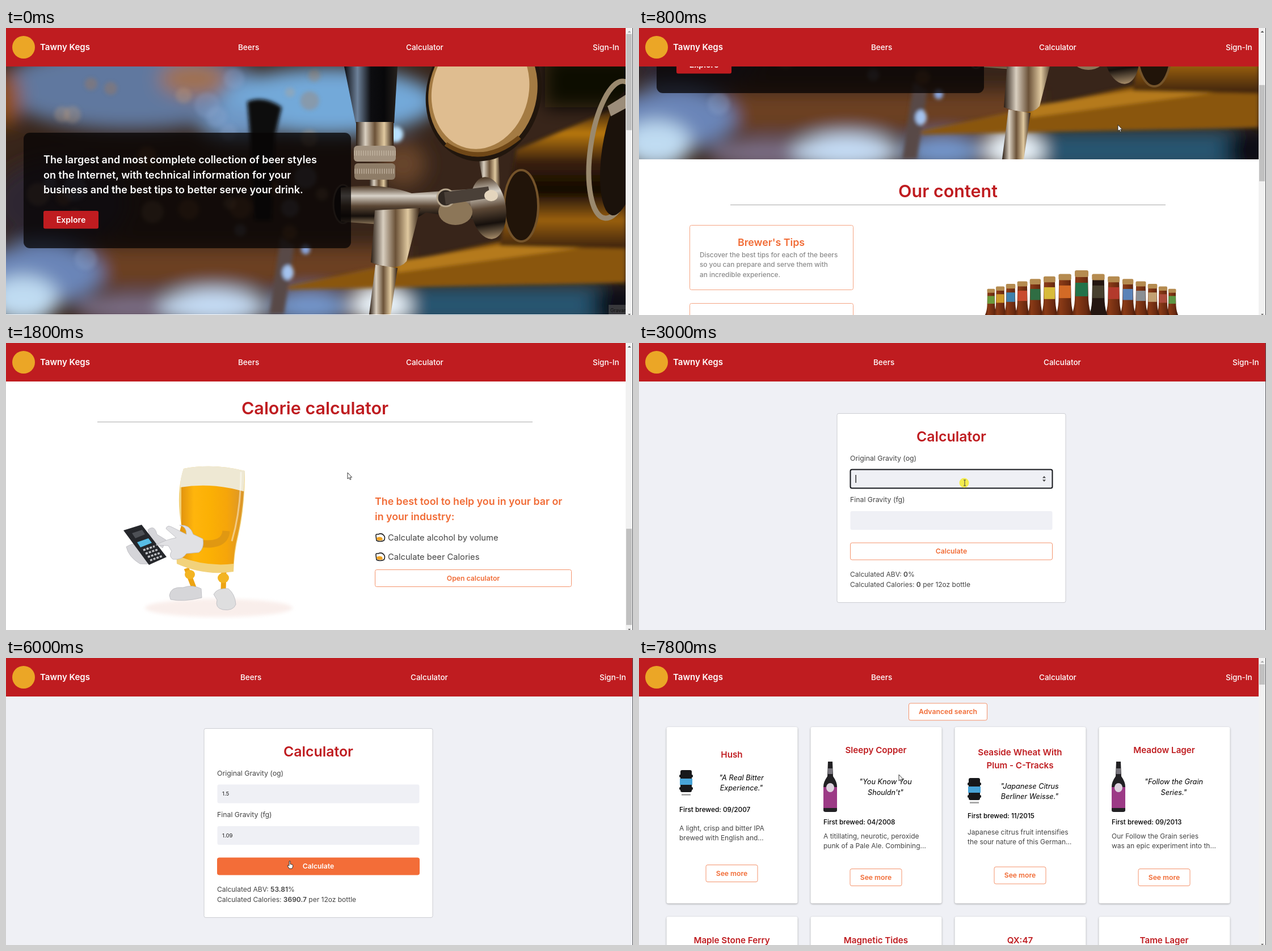
Animation of 1105 by 507 pixels, one loop 8000 ms. Source, as an HTML page:

```html
<!DOCTYPE html>
<html lang="en">
<head>
<meta charset="utf-8">
<title>Beer site tour</title>
<style>
html, body { margin: 0; width: 100%; height: 100%; overflow: hidden; background: #fff; }
svg { display: block; width: 1105px; height: 507px; }
text { font: 400 12px Inter, "Open Sans", sans-serif; font-optical-sizing: none; fill: #444; }
.mid { text-anchor: middle; }
.brand { font-size: 15px; font-weight: 600; fill: #fff; }
.nav { font-size: 13.5px; font-weight: 500; fill: #fff; }
.lead { font-size: 18px; font-weight: 600; fill: #fff; }
.explore { font-size: 14.2px; font-weight: 600; fill: #fff; text-anchor: middle; }
.h1 { font-size: 30.5px; font-weight: 600; fill: #bf1c20; text-anchor: middle; }
.h2 { font-size: 17.8px; font-weight: 600; fill: #f16b35; }
.note { font-size: 11.8px; font-weight: 500; fill: #8b8b8b; }
.item { font-size: 14.7px; }
.h3 { font-size: 24.8px; font-weight: 600; fill: #bf1c20; text-anchor: middle; }
.h4 { font-size: 15.2px; font-weight: 600; fill: #bf1c20; text-anchor: middle; }
.quote { font-size: 12.7px; font-style: italic; fill: #000; text-anchor: middle; }
.first { font-size: 11.8px; font-weight: 500; fill: #000; }
.label { font-size: 12.3px; }
.value { font-size: 9.6px; fill: #222; }
.strong { font-weight: 600; }
.btn rect { fill: #fff; stroke: #f4936c; }
.btn text { font-size: 12.2px; font-weight: 600; fill: #f16b35; text-anchor: middle; }
.btn.hot rect { fill: #f36d38; stroke: #f36d38; }
.btn.hot text { fill: #fff; }
.field { fill: #eff0f5; }
.field.on { stroke: #15171c; stroke-width: 2; }
.card { fill: #fff; filter: drop-shadow(0 1px 1.5px #0005); }
</style>
</head>
<body>
<svg id="stage" viewBox="0 0 1105 507"></svg>
<script>
const $ = id => document.getElementById(id);
const text = (x, y, s, cls = '') => `<text x="${x}" y="${y}" class="${cls}">${s}</text>`;
const lines = (x, y, step, list, cls) => list.map((s, i) => text(x, y + i * step, s, cls)).join('');
const rect = (x, y, w, h, fill, more = '') =>
  `<rect x="${x}" y="${y}" width="${w}" height="${h}" fill="${fill}" ${more}/>`;
const oval = (x, y, rx, ry, fill, more = '') =>
  `<ellipse cx="${x}" cy="${y}" rx="${rx}" ry="${ry}" fill="${fill}" ${more}/>`;
const path = (d, fill, more = '') => `<path d="${d}" fill="${fill}" ${more}/>`;
const button = (x, y, w, label, id = '') => `<g class="btn" id="${id}">
  ${rect(x + .5, y + .5, w - 1, 30, '#fff', 'rx="3"')}${text(x + w / 2, y + 19.5, label, 'mid')}</g>`;
const gradient = (id, x2, y2, ...colors) => `<linearGradient id="${id}" x2="${x2}" y2="${y2}">` +
  colors.map((c, i) => `<stop offset="${i / (colors.length - 1)}" stop-color="${c}"/>`).join('') + '</linearGradient>';

const defs = `<defs>
  ${gradient('chrome', 0, 1, '#4a3522', '#d8d2c8', '#5c4836', '#16100c', '#a48a68')}
  ${gradient('steel', 1, 0, '#2a1c12', '#d9cfc0', '#6b5238', '#e0c9a0', '#2c1a0e')}
  ${gradient('handle', 1, 0, '#0a0b10', '#6d8199', '#0d0d10', '#08080a', '#25201c')}
  ${gradient('pipe', 0, 1, '#1a0d04', '#b8780f', '#3a2008', '#130a05', '#9a600d', '#3b2109')}
  ${gradient('beer', 1, 0, '#d98a10', '#ffb50c', '#fbb004', '#f6a50a', '#d9952c')}
  ${gradient('glass', 1, 0, '#2c1109', '#8a3a16', '#6a2a10', '#240d07')}
  <filter id="soft" x="-20%" y="-20%" width="140%" height="140%"><feGaussianBlur stdDeviation="16"/></filter>
  <filter id="haze"><feGaussianBlur stdDeviation="3"/></filter>
  <clipPath id="photo"><rect y="68" width="1092" height="438"/></clipPath>
</defs>`;

function bokeh() {
  const rnd = n => Math.abs(Math.sin(n * 127.1) * 43758.5) % 1;
  return Array.from({ length: 30 }, (_, i) => {
    const r = 8 + 15 * rnd(i + .7);
    return oval(40 + 520 * rnd(i + .1), 75 + 370 * rnd(i + .4), r, r,
      ['#c9a07a', '#8fa9d0', '#b9753a'][i % 3], 'opacity=".28"');
  }).join('');
}

function barPhoto() {
  return `<g clip-path="url(#photo)">
    ${rect(0, 68, 1092, 438, '#38251a')}
    <g filter="url(#soft)">
      ${oval(220, 105, 230, 75, '#60789f')}${oval(95, 310, 120, 80, '#2e2832')}
      ${oval(0, 125, 26, 50, '#93500f')}${oval(330, 90, 60, 30, '#a0714f')}
      ${oval(570, 130, 190, 60, '#73a9d9')}${oval(410, 170, 70, 30, '#6e96c4')}
      ${rect(140, 385, 560, 75, '#6c4121')}${oval(60, 435, 110, 55, '#6b85b8')}
      ${oval(30, 480, 62, 42, '#c0dcf2')}${oval(230, 495, 110, 26, '#7b6e86')}
      ${oval(365, 492, 95, 32, '#c5dcf5')}${oval(535, 492, 75, 28, '#7599d0')}
      ${rect(690, 455, 420, 70, '#285471')}${rect(950, 50, 170, 90, '#080706')}
      ${oval(1090, 490, 60, 40, '#0c1117')}${oval(660, 490, 54, 32, '#eef8ff')}
      ${oval(700, 240, 40, 40, '#68452c')}
    </g>
    <g filter="url(#haze)">
      ${bokeh()}
      ${path('M470 462 L1092 330 V450 L690 458Z', '#8a560f')}
      ${path('M690 412 L1092 350 V378 L690 432Z', '#b57a1b')}
      ${path('M900 215 L1092 135 V390 L870 385Z', 'url(#pipe)')}
      ${path('M425 130 Q455 118 486 140 L474 190 L468 340 H438 L430 190Z', '#11100f')}
      ${path('M484 370 L508 385 L490 506 H464Z', '#594a47')}
      ${oval(497, 432, 10, 13, '#a4c3ef')}${oval(528, 391, 8, 9, '#89a5dc')}
      ${oval(687, 188, 13, 14, '#b9e2ff')}
    </g>
    ${path('M1040 506 H0', 'none')}
    ${oval(1072, 215, 42, 122, 'none', 'transform="rotate(8 1072 215)" stroke="#9a896e" stroke-width="9"')}
    ${oval(1084, 220, 34, 112, '#1b120b', 'transform="rotate(8 1084 220)"')}
    ${path('M1060 138 L1092 118 V142 L1066 156Z', '#9c8d7a')}
    ${path('M596 68 H690 L684 168 H616Z', 'url(#handle)')}
    ${rect(617, 166, 66, 42, 'url(#steel)')}
    ${rect(640, 266, 34, 26, 'url(#steel)')}
    ${rect(613, 208, 74, 28, '#a39380', 'rx="6"')}${rect(614, 239, 72, 29, '#8e7c67', 'rx="6"')}
    ${path('M613 221 H687 M614 253 H686', 'none', 'stroke="#c9bba8" stroke-width="9" stroke-dasharray="2 2" opacity=".6"')}
    ${oval(594, 311, 17, 34, '#14100d', 'stroke="#57483c" stroke-width="3"')}
    ${path('M590 282 Q660 272 715 292 L850 282 L856 342 L740 326 L700 350 L590 342Z', 'url(#chrome)')}
    ${path('M650 322 L730 318 L706 412 Q690 432 643 414Z', 'url(#steel)')}
    ${path('M651 418 L690 424 L678 506 H640Z', 'url(#steel)')}
    ${path('M832 226 H868 L872 300 H846Z', 'url(#steel)')}
    ${oval(908, 314, 30, 63, '#211409', 'stroke="#74532a" stroke-width="4"')}
    ${oval(850, 318, 31, 55, 'url(#chrome)', 'transform="rotate(-8 850 318)"')}
    ${oval(792, 325, 30, 23, '#8c7658')}${oval(775, 300, 15, 15, '#302822', 'stroke="#b6a68e" stroke-width="3"')}
    ${path('M772 290 L850 280 L854 300 L775 312Z', '#4a4038')}
    ${oval(855, 296, 12, 10, '#e4d5bd')}
    <g transform="rotate(14 840 115)">
      ${oval(842, 115, 101, 121, '#21160d')}${oval(840, 113, 95, 115, '#a47b43')}
      ${oval(835, 111, 85, 105, '#dfbd90')}
    </g>
    ${path('M775 205 Q840 247 905 193', 'none', 'stroke="#6f4717" stroke-width="8"')}
  </g>`;
}

function bottle(x, top, bottom, label, glass) {
  const k = (bottom - top) / 194;
  return `<g transform="translate(${x} ${top}) scale(${k})">
    ${path('M-11 4 H11 L12 52 Q13 72 21 86 Q25 94 25 106 V187 Q24 194 16 194 H-16 Q-24 194 -25 187 V106 Q-25 94 -21 86 Q-13 72 -12 52Z', glass)}
    ${rect(-12, 0, 24, 12, '#b58b50', 'rx="3"')}${rect(-11, 22, 22, 24, label)}
    ${rect(-25, 106, 50, 66, label)}${oval(0, 138, 18, 22, '#e4ddc4', 'opacity=".75"')}
    ${rect(-17, 92, 4, 88, '#fff', 'opacity=".2"')}</g>`;
}

function bottleRow() {
  const left = ['#d36a26', '#d8bb3a', '#2f6d43', '#c94b2e', '#3f81ad', '#cf9a2a', '#6c9a3c'];
  const right = ['#48402f', '#b33a2c', '#5b83b8', '#8a8f94', '#c3a173', '#ab4b3a', '#5e9644'];
  let out = oval(781, 262, 165, 26, '#9b7358', 'opacity=".22" filter="url(#haze)"');
  for (let i = 7; i > 0; i--) {
    const dx = 30.5 * i - 1.1 * i * i, top = 86 + 4.4 * i, bottom = 278 - 7.2 * i;
    out += bottle(780 - dx, top, bottom, left[i - 1], 'url(#glass)') +
      bottle(780 + dx, top, bottom, right[i - 1], i === 1 ? '#241611' : 'url(#glass)');
  }
  return out + bottle(780, 84, 278, '#23734a', 'url(#glass)');
}

const glove = 'stroke="#b9b9be" stroke-width=".8"';
const mascot = `
  ${oval(375, 468, 130, 16, '#f6e3de', 'opacity=".6" filter="url(#haze)"')}
  ${path('M318 398 L331 432 M384 402 L383 436', 'none', 'stroke="#eda413" stroke-width="9"')}
  ${oval(324, 409, 9, 8, '#f3b422')}${oval(383, 415, 10, 9, '#f3b422')}
  ${path('M288 446 Q290 430 312 432 Q328 426 344 434 L345 450 Q312 458 290 453Z', '#d6d6d9', glove)}
  ${path('M366 444 Q372 432 392 434 Q404 444 405 462 Q400 474 382 471 Q368 468 372 454Z', '#dededf', glove)}
  ${path('M313 222 Q365 212 421 226 Q421 290 410 338 Q402 370 401 404 Q350 412 301 390 Q299 362 309 322 Q299 266 313 222Z', '#f2d27b')}
  ${path('M309 254 Q362 244 419 262 Q416 308 407 345 Q402 366 401 390 Q352 396 302 376 Q301 350 309 322Z', 'url(#beer)')}
  ${path('M313 222 Q365 212 421 226 L419 262 Q362 246 307 255 Q307 238 313 222Z', '#eee8d3')}
  ${path('M414 228 Q414 296 398 350', 'none', 'stroke="#fff" stroke-width="3" opacity=".45"')}
  ${path('M388 332 Q386 360 340 354', 'none', 'stroke="#e09812" stroke-width="13"')}
  ${path('M212 360 Q225 352 236 356 L278 372 Q260 394 236 390 Q216 378 212 360Z M250 330 Q262 320 266 338 L282 348 L276 362 L254 344Z', '#d5d5d9', glove)}
  ${path('M207 331 L239 321 L283 378 L252 392Z', '#25272b')}
  ${path('M222 336 L240 330 L245 338 L228 345Z', '#4d5055')}${path('M231 352 L251 345 L257 353 L237 361Z', '#58bde6')}
  ${path('M242 366 L262 359 M246 372 L267 365 M250 378 L271 371 M254 384 L276 376', 'none', 'stroke="#bcbec2" stroke-width="3.5" stroke-dasharray="4 2"')}
  ${path('M264 357 Q282 347 300 344 L282 328 Q284 320 294 326 L318 338 Q318 324 306 322 Q324 320 330 338 L347 346 Q350 362 340 370 L318 372 Q310 384 294 382 Q286 376 292 368 L286 358Z', '#e1e1e4', glove)}`;

const bullet = y => `<g transform="translate(659 ${y})">
  ${path('M-7 -3 Q-8 -7 -3 -6 Q3 -9 7 -4 Q10 0 7 5 Q0 8 -6 5Z', '#fff', 'stroke="#222" stroke-width="1.6"')}
  ${path('M-6 0 Q0 -3 4 0 L5 4 Q0 6 -5 4Z', '#f0a324')}</g>`;

const tip = (y, title, body) => rect(89.5, y + .5, 288, 114, '#fff', 'rx="3" stroke="#f5a483"') +
  text(233, y + 37, title, 'h2 mid') + lines(107, y + 57, 17.4, body, 'note');
const rule = y => rect(161, y, 767, 1, '#aaa');

const home = `<g id="home"><g id="scroller">
  ${rect(0, 68, 1092, 1500, '#fff')}${barPhoto()}
  ${rect(31, 185, 577, 204, '#070504', 'rx="11" opacity=".76"')}
  ${lines(66, 239, 26.5, ['The largest and most complete collection of beer styles',
    'on the Internet, with technical information for your',
    'business and the best tips to better serve your drink.'], 'lead')}
  ${rect(66, 323, 97, 31.5, '#bf1c20', 'rx="3"')}${text(114.5, 344, 'Explore', 'explore')}
  ${text(544.5, 573, 'Our content', 'h1')}${rule(586)}
  ${tip(622, "Brewer's Tips", ['Discover the best tips for each of the beers', 'so you can prepare and serve them with', 'an incredible experience.'])}
  ${tip(760, 'Ingredients', ['Discover the ingredients needed to brew', 'your ideal beer, from the malts, hops and', 'yeast needed to brew it.'])}
  ${tip(898, 'Food pairing', ['Know which foods each drink is best suited', 'to, and serve the beer that best suits each', 'circumstance.'])}
  <g transform="translate(0 618)">${bottleRow()}${button(694, 308, 173, 'See more')}</g>
  ${text(544.5, 1090, 'Calorie calculator', 'h1')}${rule(1103)}
  <g transform="translate(0 964)">${mascot}
    ${lines(650, 286, 26.5, ['The best tool to help you in your bar or', 'in your industry:'], 'h2')}
    ${bullet(344)}${text(673, 349, 'Calculate alcohol by volume', 'item')}
    ${bullet(378)}${text(673, 383, 'Calculate beer Calories', 'item')}
    ${button(650, 400, 347, 'Open calculator', 'open')}</g>
  </g>
  <g id="hint">${rect(1062, 489, 30, 17, '#555', 'opacity=".6"')}<text x="1065" y="502" style="font-size:8.5px;fill:#111">Gravar</text></g>
</g>`;

const field = (n, y) => rect(372.5, y, 356, 33, '', `rx="3" class="field" id="field${n}"`) +
  `<text x="381" y="${y + 19.5}" class="value" id="value${n}"></text>`;

const calc = `<g id="calc">${rect(0, 68, 1104, 439, '#eff0f5')}
  ${rect(349, 124.5, 403, 334, '#fff', 'rx="3" stroke="#cccdd2"')}
  ${text(550.5, 174, 'Calculator', 'h3')}
  ${text(372, 207.5, 'Original Gravity (og)', 'label')}${field(0, 223.5)}
  ${text(372, 281, 'Final Gravity (fg)', 'label')}${field(1, 297)}
  <g id="focus">${path('M711 238.500 L714 235 L717 238.500Z M711 241.500 L714 245 L717 241.500Z', '#444')}
    <rect id="caret" y="233" width="1.3" height="14" fill="#111"/></g>
  ${button(372, 352.5, 357, 'Calculate', 'run')}
  ${text(372, 413, 'Calculated ABV: <tspan class="strong" id="abv"></tspan>%')}
  ${text(372, 430.5, 'Calculated Calories: <tspan class="strong" id="kcal"></tspan> per 12oz bottle')}
</g>`;

const can = (x, y) => `<g transform="translate(${x} ${y})">${rect(2, 0, 20, 39, '#17181b', 'rx="3"')}
  ${rect(0, 8, 24, 5, '#17181b', 'rx="2"')}${rect(1, 15, 22, 11, '#48a4d8')}${rect(0, 30, 24, 5, '#17181b', 'rx="2"')}
  ${rect(4, 42, 16, 3, '#aaa')}</g>`;
const tallBottle = (x, y) => `<g transform="translate(${x} ${y})">
  ${path('M8 0 H16 L17 26 Q24 36 24 44 V86 Q24 89 20 89 H4 Q0 89 0 86 V44 Q0 36 7 26Z', '#222124')}
  ${rect(0, 45, 24, 37, '#9c3a86')}${rect(8, 12, 8, 10, '#77747c')}${oval(12, 46, 7, 8, '#ddd2de')}</g>`;

const beers = [
  { title: ['Hush'], at: 176, art: can, artY: 198, quote: ['"A Real Bitter', 'Experience."'], quoteY: 215.5,
    date: '09/2007', dateY: 272, body: ['A light, crisp and bitter IPA', 'brewed with English and…'], bodyY: 304.5, more: 365 },
  { title: ['Sleepy Copper'], at: 168, art: tallBottle, artY: 183, quote: ['"You Know You', 'Shouldn\'t"'], quoteY: 223,
    date: '04/2008', dateY: 294, body: ['A titillating, neurotic, peroxide', 'punk of a Pale Ale. Combining…'], bodyY: 319, more: 372 },
  { title: ['Seaside Wheat With', 'Plum - C-Tracks'], at: 172, art: can, artY: 212, quote: ['"Japanese Citrus', 'Berliner Weisse."'], quoteY: 230.5,
    date: '11/2015', dateY: 283, body: ['Japanese citrus fruit intensifies', 'the sour nature of this German…'], bodyY: 312, more: 368.5 },
  { title: ['Meadow Lager'], at: 168, art: tallBottle, artY: 183, quote: ['"Follow the Grain', 'Series."'], quoteY: 223,
    date: '09/2013', dateY: 294, body: ['Our Follow the Grain series', 'was an epic experiment into th…'], bodyY: 319, more: 372 },
];
const nextRow = ['Maple Stone Ferry', 'Magnetic Tides', 'QX:47', 'Tame Lager'];

const list = `<g id="list">${rect(0, 68, 1092, 439, '#eff0f5')}
  ${button(475, 79.5, 139, 'Advanced search')}
  ${beers.map((b, i) => `<g transform="translate(${48.5 + 254 * i} 0)">
    ${rect(0, 122, 231, 311.5, '', 'rx="3" class="card"')}${rect(0, 457, 231, 80, '', 'rx="3" class="card"')}
    ${lines(115, b.at, 22.5, b.title, 'h4')}${b.art(22.5, b.artY)}
    ${lines(132, b.quoteY, 18.8, b.quote, 'quote')}
    ${text(22.5, b.dateY, 'First brewed: ' + b.date, 'first')}
    ${lines(22.5, b.bodyY, 17.4, b.body)}${button(69, b.more, 92, 'See more')}
    ${text(115, 503.5, nextRow[i], 'h4')}</g>`).join('')}
</g>`;

const chrome = `${rect(0, 0, 1104, 68, '#bf1c20')}${oval(31, 34, 20, 20, '#eba626')}
  ${text(60, 39, 'Tawny Kegs', 'brand')}
  <g id="nav">${['Beers', 'Calculator', 'Sign-In'].map(s => text(0, 38.5, s, 'nav')).join('')}</g>
  <g id="bar">${rect(1092, 0, 12, 507, '#f1f1f1')}
    ${path('M1095.500 8 L1098.500 5 L1101.500 8Z', '#505050', 'id="up"')}${path('M1096 505 H1101 L1098.500 507Z', '#505050')}
    ${rect(1093, 11, 10, 170, '#c1c1c1', 'id="thumb"')}</g>
  ${rect(1104, 0, 1, 507, '#55565a')}`;

const pointer = `<g id="pointer">${oval(-1, 0, 8.5, 8.5, '#f3ec4e', 'id="ring"')}
  ${path('M0 0 V11 L2.600 8.800 L4.300 12.500 L6 11.700 L4.400 8.200 H7.600Z', '#fff', 'id="arrow" stroke="#222" stroke-width=".9"')}
  ${path('M-1 0 Q0 -1 1 0 V5 L5 6 Q6 7 5.500 10 L4 13 H-1 L-4 8 Q-4 6 -1 8Z', '#fff', 'id="hand" stroke="#222" stroke-width=".9"')}
  ${path('M-2 -5 H2 M-2 5 H2 M0 -5 V5', 'none', 'id="beam" stroke="#444" stroke-width="1"')}</g>`;

$('stage').innerHTML = defs + home + calc + list + chrome + pointer;

// Each row: time, then values; linear in between.
const scrollPath = [[0, 0], [200, 18], [800, 274], [1200, 618], [1800, 964]];
const pointerPath = [
  [0, 844, 171, ''], [200, 844, 171, 'arrow'], [1400, 844, 171, 'arrow'], [1800, 602, 229, 'arrow'],
  [2200, 790, 412, 'hand'], [2600, 790, 412, 'arrow'], [3000, 574, 247, 'beam'], [4000, 574, 247, ''],
  [4600, 574, 247, 'beam'], [4800, 574, 320, 'beam'], [5200, 574, 320, ''], [5600, 540, 340, 'arrow'],
  [5800, 500, 359, 'hand'], [6200, 500, 359, 'arrow'], [6600, 417, 37, 'hand'], [7500, 417, 37, 'arrow'],
  [7800, 458, 206, 'arrow']];

function along(points, t) {
  const i = points.findLastIndex(p => p[0] <= t), a = points[i], b = points[i + 1] || a;
  const k = a === b ? 0 : (t - a[0]) / (b[0] - a[0]);
  return a.slice(1).map((v, j) => typeof v === 'number' ? v + (b[j + 1] - v) * k : v);
}
const show = (id, on) => $(id).style.display = on ? '' : 'none';
const typed = (s, start, t) => s.slice(0, Math.max(0, (t - start) / 200 + 1));

function draw(t) {
  const page = t < 2600 ? 'home' : t < 6800 ? 'calc' : 'list';
  for (const id of ['home', 'calc', 'list']) show(id, id === page);

  const wide = page === 'calc';
  [[409, 413], [705, 713], [1034, 1046]].forEach((x, i) => $('nav').children[i].setAttribute('x', x[+wide]));
  show('bar', !wide);

  const [scroll] = along(scrollPath, t);
  $('scroller').setAttribute('transform', `translate(0 ${-scroll})`);
  $('thumb').setAttribute('y', page === 'home' ? 10.5 + scroll * .3295 : 11);
  $('thumb').setAttribute('height', page === 'home' ? 170 : 36);
  $('up').setAttribute('fill', page === 'home' && t ? '#505050' : '#a3a3a3');
  show('hint', t === 0);
  $('open').classList.toggle('hot', t >= 2200);

  const focus = t >= 3000 && t < 4800 ? 0 : t >= 4800 && t < 5800 ? 1 : -1;
  $('value0').textContent = typed('1.5', 4000, t);
  $('value1').textContent = typed('1.09', 5000, t);
  for (const n of [0, 1]) $('field' + n).classList.toggle('on', n === focus);
  show('focus', focus >= 0);
  if (focus >= 0 && wide) {
    $('focus').setAttribute('transform', `translate(0 ${focus * 73.5})`);
    $('caret').setAttribute('x', 381.5 + $('value' + focus).getComputedTextLength());
  }
  const done = t >= 6000;
  $('abv').textContent = done ? '53.81' : '0';
  $('kcal').textContent = done ? '3690.7' : '0';
  $('run').classList.toggle('hot', t >= 5800 && t < 6200);

  const [x, y, kind] = along(pointerPath, t);
  $('pointer').setAttribute('transform', `translate(${x} ${y})`);
  for (const id of ['arrow', 'hand', 'beam']) show(id, id === kind);
  show('ring', [2400, 3000, 4800, 5800].includes(t));
}

function tick() {
  draw(Math.floor(performance.now() % 8000 / 200) * 200);
  requestAnimationFrame(tick);
}
tick();
</script>
</body>
</html>
```
